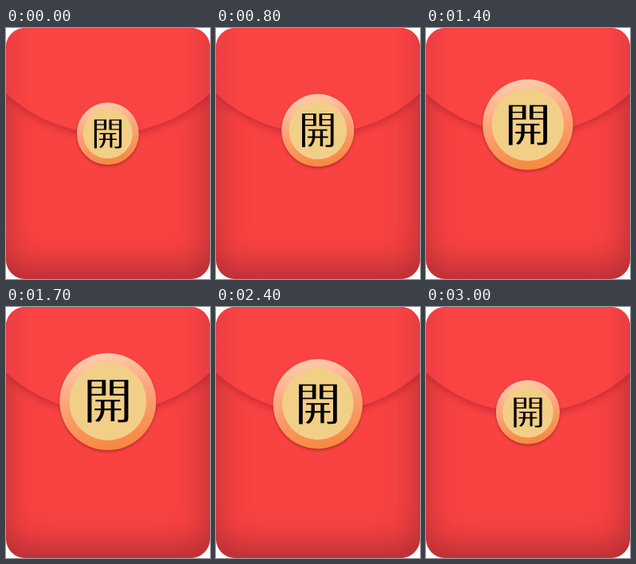
Recreate the animation shown at these times as an HTML page. Size 256 px wide and 314 px high, loop 3100 ms.

```html
<!DOCTYPE html>
<html lang="zh-Hant">
<head>
<meta charset="utf-8">
<title>Red envelope</title>
<style>
  html, body { margin: 0; width: 100%; height: 100%; overflow: hidden; background: #fff; }
  #envelope {
    width: 256px; height: 314px; overflow: hidden; border-radius: 24px;
    background: #f94242;
    box-shadow: inset -2px -14px 40px rgba(115, 30, 40, .55);
  }
  svg { display: block; }
  #flap { filter: drop-shadow(0 4px 5px rgba(140, 20, 40, .42)); }
  #button { filter: drop-shadow(0 2px 1.5px rgba(150, 30, 20, .6)); }
  #label {
    font-family: "Noto Sans CJK TC", "Noto Sans CJK JP", "Noto Sans CJK SC", sans-serif;
    text-anchor: middle;
  }
  /* The pale outline thins every stroke; darken keeps it from hiding the other copies. */
  #label text { stroke: #f2cf87; stroke-width: .026em; mix-blend-mode: darken; }
</style>
</head>
<body>
<div id="envelope">
  <svg width="256" height="314" viewBox="0 0 256 314">
    <defs>
      <linearGradient id="red">
        <stop offset="0" stop-color="#ec3e43"/>
        <stop offset=".12" stop-color="#fa4343"/>
        <stop offset=".88" stop-color="#fa4343"/>
        <stop offset="1" stop-color="#e83d42"/>
      </linearGradient>
      <linearGradient id="rim" x1=".4" y1="0" x2=".6" y2="1">
        <stop offset="0" stop-color="#ffcdae"/>
        <stop offset=".45" stop-color="#fda27a"/>
        <stop offset="1" stop-color="#f6883e"/>
      </linearGradient>
    </defs>
    <path id="flap" d="M0-9H256V82A189 189 0 0 1 0 82Z" fill="url(#red)"/>
    <g id="button">
      <circle id="outer" cx="127.8" fill="url(#rim)"/>
      <circle id="inner" cx="127.8" fill="#f2cf87"/>
    </g>
    <g id="label">
      <text>開</text><text>開</text><text>開</text>
    </g>
  </svg>
</div>
<script>
  const LOOP = 3100, STEP = 100, LOW = 100, RISE = 1900;
  const [outer, inner] = document.querySelectorAll('circle');
  const label = document.getElementById('label');

  // Slow swell, quicker return, both eased like a sine.
  function swell(time) {
    const t = (time - LOW + LOOP) % LOOP;
    const phase = t < RISE ? t / RISE : 1 + (t - RISE) / (LOOP - RISE);
    return (1 - Math.cos(Math.PI * phase)) / 2;
  }

  function setCircle(circle, y, r) {
    circle.setAttribute('cy', y);
    circle.setAttribute('r', r);
  }

  function draw(now) {
    const s = swell(Math.floor(now % LOOP / STEP) * STEP);
    const y = 132.5 - 15 * s;
    const r = 38.5 + 23.5 * s;
    const size = 41 + 21.4 * s;
    setCircle(outer, y, r);
    setCircle(inner, y, r * .797);
    label.setAttribute('font-size', size);
    // Sideways copies thicken the upright strokes only.
    [...label.children].forEach((text, i) => {
      text.setAttribute('x', 127.8 + (i - 1) * size * .016);
      text.setAttribute('y', y + size * .36);
    });
  }

  const start = performance.now();
  function tick() {
    draw(performance.now() - start);
    requestAnimationFrame(tick);
  }
  tick();
</script>
</body>
</html>
```
